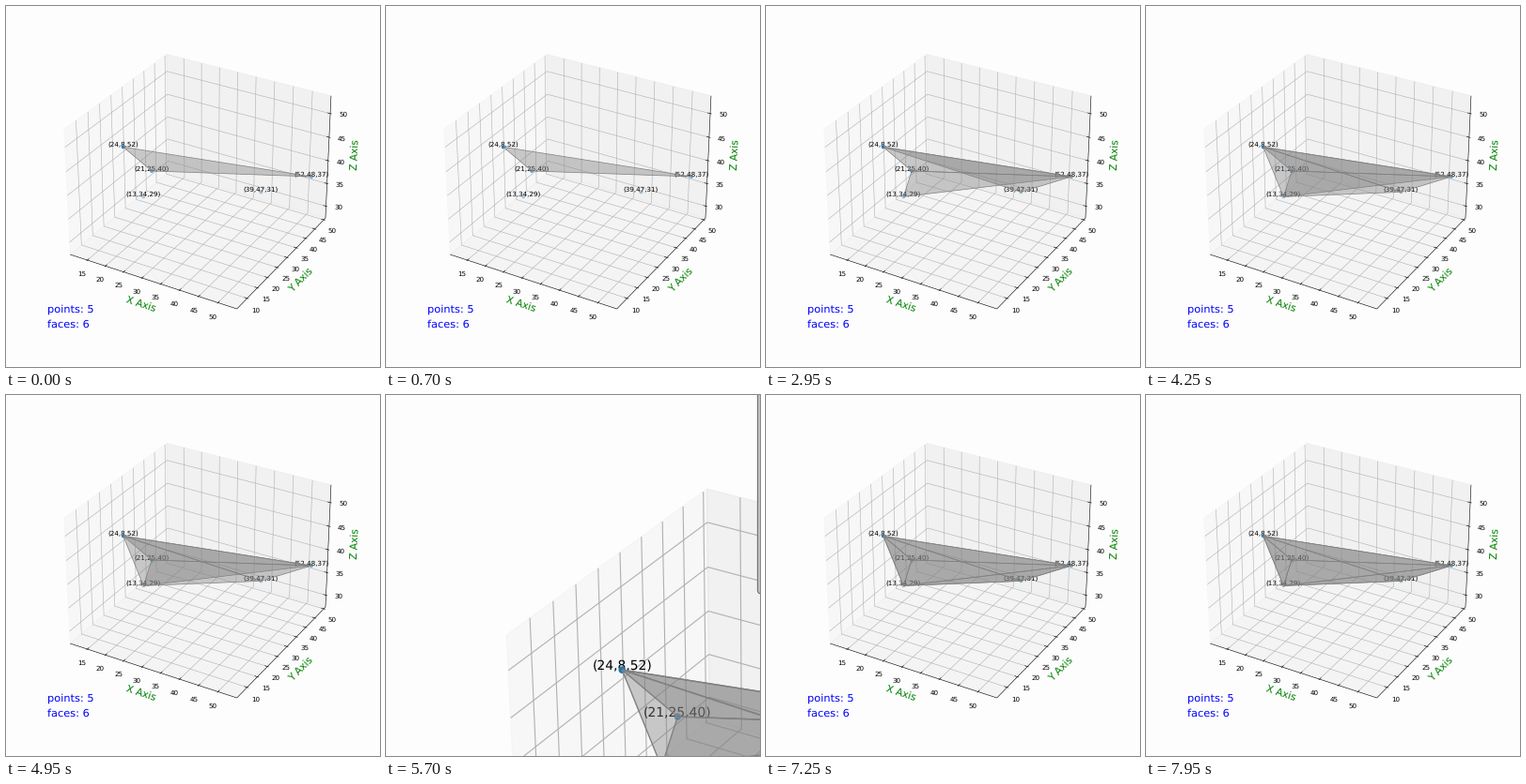
A matplotlib script for the animation above (8.7 s loop, 398x385 px).

```python
import numpy as np
import matplotlib.pyplot as plt
from matplotlib.animation import FuncAnimation
from matplotlib.patches import FancyBboxPatch

plt.rcParams["font.family"] = "DejaVu Sans"
plt.rcParams["text.hinting"] = "none"

W, H, DPI = 398, 385, 100
STEP, LOOP = 50, 8700
STARTS = [0, 1250, 2750, 4250, 5750, 7250]
CLOSEUP = 5700
BG = "#fdfdfd"

POINTS = np.array([(24, 8, 52), (21, 25, 40), (13, 34, 29),
                   (39, 47, 31), (52, 48, 37)], float)
FACES = [(0, 1, 4), (0, 3, 4), (1, 2, 4), (0, 2, 3), (2, 3, 4), (0, 1, 2)]

# Axis limits: 5% data margin plus the usual 3D padding
span = np.ptp(POINTS, axis=0)
pad = span * (0.05 + 1.1 / 48)
LO, HI = POINTS.min(axis=0) - pad, POINTS.max(axis=0) + pad
TICKS = [np.arange(15, 51, 5), np.arange(10, 51, 5), np.arange(30, 51, 5)]

# Camera at elevation 30, azimuth -60
BOX = np.array([4, 4, 3]) * 1.9057 / np.sqrt(41)
EL, AZ = np.radians(30), np.radians(-60)
EYE = np.array([np.cos(EL) * np.cos(AZ), np.cos(EL) * np.sin(AZ), np.sin(EL)])
RIGHT = np.array([-np.sin(AZ), np.cos(AZ), 0])
UP = np.cross(EYE, RIGHT)


def unit(p):
    return (np.asarray(p, float) - LO) / (HI - LO)


class Scene:
    """The whole plot, drawn at scale k with its centre at (ox, oy)."""

    def __init__(self, fig, k, ox, oy):
        self.k, self.ox, self.oy = k, ox, oy
        self.ax = fig.add_axes([0, 0, 1, 1])
        self.ax.set(xlim=(0, W), ylim=(H, 0))
        self.ax.axis("off")
        self.panes()
        for i in range(3):
            self.axis(i)
        self.labels()
        self.dots()
        self.faces = [self.face(f) for f in FACES]

    def project(self, frac):
        p = (np.atleast_2d(frac) - 0.5) * BOX
        scale = 3330 * self.k / (10 - p @ EYE)
        return np.column_stack([self.ox + p @ RIGHT * scale,
                                self.oy - p @ UP * scale])

    def line(self, frac, color, z):
        self.ax.plot(*self.project(frac).T, color=color, lw=0.8 * self.k,
                     zorder=z, solid_capstyle="butt")

    def text(self, xy, s, size, color="black", **kw):
        self.ax.text(*xy, s, fontsize=size * self.k, color=color,
                     zorder=3, clip_on=True, **kw)

    def panes(self):
        walls = [([(0, 0, 0), (0, 1, 0), (0, 1, 1), (0, 0, 1)], 0.95),
                 ([(0, 1, 0), (1, 1, 0), (1, 1, 1), (0, 1, 1)], 0.90),
                 ([(0, 0, 0), (1, 0, 0), (1, 1, 0), (0, 1, 0)], 0.925)]
        for corners, g in walls:
            self.ax.fill(*self.project(corners).T, fc=(g, g, g, 0.5),
                         ec=(g, g, g, 0.5), lw=self.k, zorder=1)

    def axis(self, i):
        edge = [(0, 0, 0), (1, 0, 0), (1, 1, 0)][i]
        far = [[(0, 0, 0), (0, 1, 0), (0, 1, 1)],
               [(1, 0, 0), (0, 0, 0), (0, 0, 1)],
               [(0, 0, 0), (0, 1, 0), (1, 1, 0)]][i]
        base = np.array(edge, float)
        out = np.where(base > 0.5, 1.0, -1.0)
        out[i] = 0
        tickdir = 1 if i == 0 else 0

        ends = np.array([base, base])
        ends[:, i] = 0, 1
        self.line(ends, "black", 2.5)

        for t in TICKS[i]:
            f = (t - LO[i]) / (HI[i] - LO[i])
            grid = np.array(far, float)
            grid[:, i] = f
            self.line(grid, "#b0b0b0", 2)
            pos = base.copy()
            pos[i] = f
            mark = np.array([pos, pos])
            mark[:, tickdir] += out[tickdir] * np.array([-0.016, 0.008])
            self.line(mark, "black", 2.5)
            self.text(self.project(pos + 0.0498 * out)[0], str(t), 10,
                      ha="center", va="top")

        mid = base.copy()
        mid[i] = 0.5
        (x0, y0), (x1, y1) = self.project(ends)
        angle = np.degrees(np.arctan2(y0 - y1, x1 - x0))
        self.text(self.project(mid + 0.1082 * out)[0], "XYZ"[i] + " Axis", 15,
                  "green", ha="center", va="center", rotation=angle,
                  rotation_mode="anchor")

    def labels(self):
        for p, xy in zip(POINTS, self.project(unit(POINTS))):
            self.text(xy, "({:.0f},{:.0f},{:.0f})".format(*p), 10, ha="center")
        for s, dy in (("points: 5", 285), ("faces: 6", 315.5)):
            self.text((self.ox - 317 * self.k, self.oy + dy * self.k), s, 16,
                      "blue")

    def dots(self):
        depth = ((unit(POINTS) - 0.5) * BOX) @ EYE
        alpha = np.interp(depth, [depth.min(), depth.max()], [0.3, 1])
        rgba = [(0x1f / 255, 0x77 / 255, 0xb4 / 255, a) for a in alpha]
        self.ax.scatter(*self.project(unit(POINTS)).T, s=20 * self.k ** 2,
                        c=rgba, lw=self.k, zorder=5)

    def face(self, ids):
        # Faces touching the nearest point lie in front of the dots
        z = 6 if 0 in ids else 4
        return self.ax.fill(*self.project(unit(POINTS[list(ids)])).T,
                            fc=(0.5, 0.5, 0.5, 0.4), ec="gray", lw=self.k,
                            joinstyle="bevel", zorder=z)[0]

    def show(self, count):
        self.ax.set_visible(count > 0)
        for i, f in enumerate(self.faces):
            f.set_visible(i < count)


fig = plt.figure(figsize=(W / DPI, H / DPI), dpi=DPI, facecolor=BG)
plot = Scene(fig, 1 / 1.95, 206.6, 180.7)
zoomed = Scene(fig, 1, 410.8, 352.3)
zoomed.ax.add_patch(FancyBboxPatch(
    (395.5, -20), 40, 232, boxstyle="round,pad=0,rounding_size=4",
    fc="#c4c4c4", ec="#777777", lw=0.9, zorder=8))


def update(i):
    t = i * STEP
    count = sum(t >= s for s in STARTS)
    close = t == CLOSEUP
    plot.show(0 if close else count)
    zoomed.show(count if close else 0)
    return []


anim = FuncAnimation(fig, update, frames=LOOP // STEP, interval=STEP,
                     repeat=True, repeat_delay=0, blit=False)
plt.show()
```
